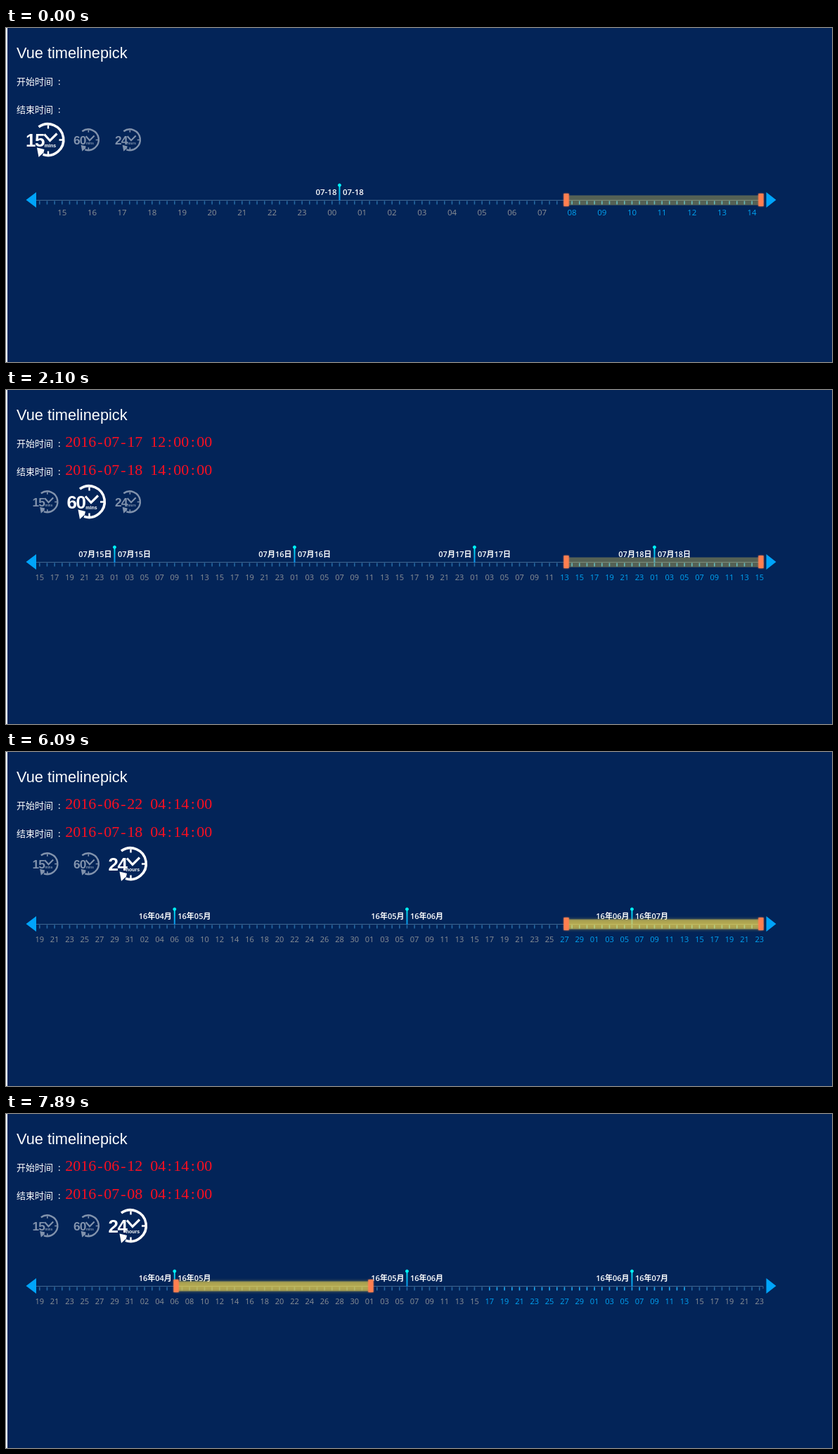
An HTML page that plays this animation: 1175x476 px, repeating every 8000 ms.

```html
<!DOCTYPE html>
<html lang="zh-CN">
<head>
<meta charset="utf-8">
<title>Vue timelinepick</title>
<style>
  html, body { margin: 0; width: 100%; height: 100%; overflow: hidden; background: #032458; }
  svg { display: block; }
  text { font-family: "Open Sans", "Noto Sans", "Noto Sans CJK SC", "Noto Sans CJK", sans-serif; white-space: pre; }
  .title { font: 21.75px "Liberation Sans", Arial, sans-serif; fill: #fff; }
  .label { font: 13px "Noto Sans CJK SC", "Noto Sans CJK", sans-serif; fill: #fff; }
  .stamp { font: 22px "Liberation Serif", serif; fill: #fb0f20; text-anchor: middle; }
  .num { font: bold 26px "Liberation Sans", Arial, sans-serif; letter-spacing: -1.5px; }
  .unit { font: bold 7px "Liberation Sans", Arial, sans-serif; text-anchor: middle; }
  .hour { fill: #8d9196; text-anchor: middle; }
  .hour.on { fill: #00a4f4; }
  .tag { fill: #fff; font-weight: 600; }
  .tick { stroke: #2468a2; stroke-width: 1.6; }
  .tick.on { stroke: #1cabf4; }
  .dot { fill: #00f0f4; stroke: #00f0f4; }
  .band { fill: #fade4f; fill-opacity: .33; }
  .band.hot { fill-opacity: .46; filter: drop-shadow(0 0 2px #fade4f); }
  .grip { fill: #ff7f50; filter: drop-shadow(0 0 1px #ff7f50); }
</style>
</head>
<body>
<svg id="stage" width="1175" height="476" viewBox="0 0 1175 476">
  <defs>
    <linearGradient id="stem" x1="0" y1="0" x2="0" y2="1">
      <stop offset="0" stop-color="#00e8f4"/><stop offset="1" stop-color="#0c8fe6"/>
    </linearGradient>
  </defs>
  <rect width="2" height="476" fill="#fff"/>
  <text class="title" x="15" y="43">Vue timelinepick</text>
  <text class="label" x="15" y="81">开始时间</text><text class="label" x="74" y="81">:</text>
  <text class="label" x="15" y="121">结束时间</text><text class="label" x="74" y="121">:</text>
  <text class="stamp" id="from" y="81"></text>
  <text class="stamp" id="to" y="121"></text>
  <g id="icons"></g>
  <path d="M43 245.5H1077V249" fill="none" stroke="#3f6690"/>
  <g id="views"></g>
  <path d="M28.5 245L43 234V256ZM1095.5 245L1081.5 234V256Z" fill="#00a4fa"/>
  <g id="range">
    <rect class="band" id="band" y="238.5" width="277" height="14"/>
    <rect class="grip" x="-3.5" y="236" width="7" height="18"/>
    <rect class="grip" x="273.5" y="236" width="7" height="18"/>
  </g>
</svg>
<script>
const LOOP = 8000, STEP = 30, SPAN = 26, TICKS = 97;
const $ = id => document.getElementById(id);
const tickX = k => 47.8 + k * 32 / 3;
const pad = n => String(n).padStart(2, '0');

function add(parent, tag, attrs = {}, text = '') {
  const el = document.createElementNS('http://www.w3.org/2000/svg', tag);
  for (const key in attrs) el.setAttribute(key, attrs[key]);
  el.textContent = text;
  parent.append(el);
  return el;
}

// Value at time t along [time, value] keys, eased between them
function tween(t, keys, ease = p => p * p * (3 - 2 * p)) {
  if (t <= keys[0][0]) return keys[0][1];
  for (let i = 1; i < keys.length; i++) {
    const [t0, a] = keys[i - 1], [t1, b] = keys[i];
    if (t < t1) return a + (b - a) * ease((t - t0) / (t1 - t0));
  }
  return keys[keys.length - 1][1];
}
const easeOut = p => 1 - (1 - p) ** 2;
const cubicInOut = p => p < .5 ? 4 * p ** 3 : 1 - 4 * (1 - p) ** 3;

// Axis labels for each zoom level
const quarter = {
  size: 11.5, base: 267, first: 3, every: 4,
  name: k => (15 + (k - 3) / 4) % 24,
  pins: [[40, '07-18', '07-18']]
};
const hourly = {
  size: 11, base: 271, first: 0, every: 2,
  name: k => (15 + k) % 24,
  pins: [15, 16, 17, 18].map((d, i) => [10 + 24 * i, `07月${d}日`, `07月${d}日`])
};
const daily = {
  size: 11, base: 271, first: 0, every: 2,
  name: k => k < 13 ? 19 + k : k < 44 ? k - 12 : k < 74 ? k - 43 : k - 73,
  pins: [[18, 4], [49, 5], [79, 6]].map(([k, m]) => [k, `16年0${m}月`, `16年0${m + 1}月`])
};

const views = [
  { at: 0, end: 0, axis: quarter, sel: 70 },
  { at: 1800, end: 2100, axis: hourly, sel: 70, from: '2016-07-17 12:00:00', to: '2016-07-18 14:00:00' },
  { at: 3900, end: 4230, axis: daily, sel: 70, from: '2016-06-22 04:14:00', to: '2016-07-18 04:14:00' },
  { at: 6840, end: 7140, axis: daily, sel: 60, from: '2016-06-12 04:14:00', to: '2016-07-08 04:14:00' }
];

function buildView(view) {
  const { axis, sel } = view;
  const root = view.root = add($('views'), 'g', { 'font-size': axis.size });
  view.ticks = add(root, 'g');
  view.stems = add(root, 'g');
  view.words = add(root, 'g');
  const on = k => k >= sel && k <= sel + SPAN ? ' on' : '';
  for (let k = 0; k < TICKS; k++) {
    const x = tickX(k);
    add(view.ticks, 'path', { class: 'tick' + on(k), d: `M${x} .5v5` });
    if (k >= axis.first && (k - axis.first) % axis.every === 0)
      add(view.words, 'text', { class: 'hour' + on(k), x, y: axis.base }, pad(axis.name(k)));
  }
  view.left = add(view.words, 'g', { 'text-anchor': 'end' });
  view.right = add(view.words, 'g');
  view.dots = axis.pins.map(([k, a, b]) => {
    const x = tickX(k);
    add(view.stems, 'rect', { x: x - 1, y: -22, width: 2, height: 22, fill: 'url(#stem)' });
    add(view.left, 'text', { class: 'tag', x: x - 4, y: 238 }, a);
    add(view.right, 'text', { class: 'tag', x: x + 4.5, y: 238 }, b);
    return add(root, 'circle', { class: 'dot', cx: x, cy: 224 });
  });
}

function drawView(view, t) {
  const p = view.end ? cubicInOut(Math.min(1, 1 - (view.end - t) / 500)) : 1;
  const shift = 17.5 * (1 - p);
  view.ticks.setAttribute('transform', `translate(0 246) scale(1 ${p})`);
  view.stems.setAttribute('transform', `translate(0 246) scale(1 ${p})`);
  view.words.setAttribute('opacity', p ** .6);
  view.left.setAttribute('transform', `translate(${-shift})`);
  view.right.setAttribute('transform', `translate(${shift})`);
  for (const dot of view.dots) {
    dot.setAttribute('r', 1.5 + p / 2);
    dot.setAttribute('fill-opacity', p >= 1 ? 1 : p * p);
    dot.setAttribute('stroke-opacity', p ** .4);
  }
}

const icons = [
  { x: 56.5, num: '15', unit: 'mins', keys: [[1799, 1], [1800, .48], [2100, 0]] },
  { x: 115, num: '60', unit: 'mins', keys: [[1380, 0], [1590, 1], [3899, 1], [3900, .48], [4230, 0]] },
  { x: 174, num: '24', unit: 'hours', keys: [[1140, 0], [1350, 1], [1380, 1], [1590, 0], [2970, 0], [3180, 1]] }
];

function buildIcon(icon) {
  const g = icon.el = add($('icons'), 'g', { fill: '#fff' });
  const line = { fill: 'none', stroke: '#fff' };
  add(g, 'path', { ...line, 'stroke-width': 3.6, d: 'M-10 -18.5A22.3 22.3 0 1 1 -4 20.8' });
  add(g, 'path', { ...line, 'stroke-width': 2.4, d: 'M3.5 -21v5M25 0h-6M3.5 21v-5' });
  add(g, 'path', { ...line, 'stroke-width': 3.2, d: 'M-2 -8L6 1L16 -9' });
  add(g, 'path', { d: 'M-12.5 11L-2 13.5L-3 18L-10 24.5Z' });
  add(g, 'text', { class: 'num', x: -28.5, y: 9 }, icon.num);
  add(g, 'text', { class: 'unit', x: 6.5, y: 10 }, icon.unit);
}

function setStamp(el, text = '') {
  if (el.textContent === text) return;
  el.setAttribute('x', [...text].map((_, i) => 89.8 + 11 * i).join(' '));
  el.textContent = text;
}

function draw(t) {
  const current = views.filter(v => t >= v.at).pop();
  for (const v of views) v.root.style.display = v === current ? '' : 'none';
  drawView(current, t);
  setStamp($('from'), current.from);
  setStamp($('to'), current.to);
  for (const icon of icons) {
    const v = tween(t, icon.keys, easeOut);
    icon.el.setAttribute('transform', `translate(${icon.x} 159.5) scale(${(2 + v) / 3})`);
    icon.el.setAttribute('opacity', .5 + v / 2);
  }
  const x = tween(t, [[6420, 797], [6780, 690.3], [7500, 690.3], [7890, 242]]);
  $('range').setAttribute('transform', `translate(${x})`);
  $('band').classList.toggle('hot', t >= 6090);
}

views.forEach(buildView);
icons.forEach(buildIcon);

function frame() {
  const t = performance.now() % LOOP;
  draw(Math.floor(t / STEP) * STEP);
  requestAnimationFrame(frame);
}
frame();
</script>
</body>
</html>
```
